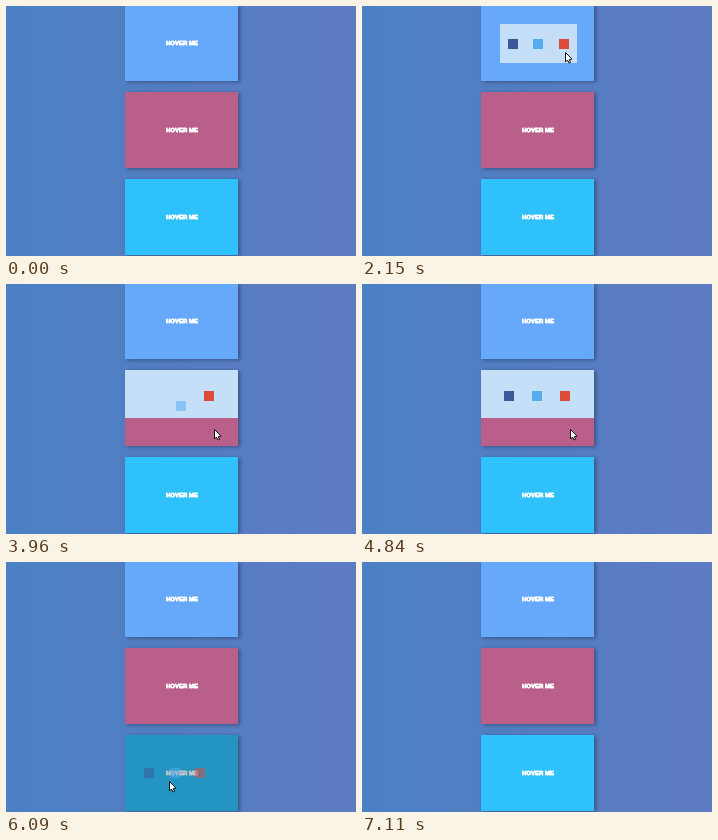
These frames come from a looping animation (350x250 px, 8.16 s). An HTML page with a canvas:

```html
<!DOCTYPE html>
<html lang="en">
<head>
<meta charset="utf-8">
<title>Hover cards</title>
<style>
  html, body { margin: 0; width: 100%; height: 100%; overflow: hidden; background: #547ec3; }
  canvas { display: block; width: 350px; height: 250px; }
</style>
</head>
<body>
<canvas id="stage" width="350" height="250"></canvas>
<script>
const ctx = document.getElementById('stage').getContext('2d');
const LOOP = 8160;
const CARD = { x: 119, w: 113, h: 76, gap: 87 };
const PALE = '#c4dff7';
const ICON_COLORS = ['#3b5998', '#55acee', '#dd4b39'];

// The pointer rests between these moves
const ENTER = { at: 230, x: 345, y: 249 };
const MOVES = [
  { from: 410, to: 710, x: 278, y: 75 },
  { from: 890, to: 1670, x: 203, y: 46 },
  { from: 2380, to: 2510, x: 300, y: 67 },
  { from: 3300, to: 3620, x: 208, y: 145 },
  { from: 5360, to: 5430, x: 293, y: 162 },
  { from: 5890, to: 6090, x: 163, y: 219 },
  { from: 6690, to: 6900, x: 337, y: 251 }
];

const clamp = v => Math.max(0, Math.min(1, v));
const mix = (a, b, p) => a + (b - a) * p;
const bezier = (a, b, s) => 3 * a * s * (1 - s) ** 2 + 3 * b * s * s * (1 - s) + s ** 3;

// CSS "ease" curve
function ease(p) {
  p = clamp(p);
  if (p === 0 || p === 1) return p;
  let lo = 0, hi = 1;
  for (let i = 0; i < 18; i++) {
    const mid = (lo + hi) / 2;
    if (bezier(0.25, 0.25, mid) < p) lo = mid; else hi = mid;
  }
  return bezier(0.1, 1, lo);
}

const hover = (t, on, off, inMs = 350, outMs = inMs) =>
  ease((t - on) / inMs) - ease((t - off) / outMs);

function rect(color, x, y, w, h) {
  ctx.fillStyle = color;
  ctx.fillRect(x, y, w, h);
}

function icons(cx, step, place) {
  ICON_COLORS.forEach((color, i) => {
    const { x = 0, y, alpha } = place(i);
    ctx.globalAlpha = clamp(alpha);
    rect(color, Math.round(cx + (i - 1) * step + x) - 5, Math.round(y) - 5, 10, 10);
  });
  ctx.globalAlpha = 1;
}

function label(y) {
  ctx.font = 'bold 6px "Liberation Sans", Arial, sans-serif';
  ctx.textAlign = 'center';
  ctx.fillStyle = ctx.strokeStyle = '#fff';
  ctx.lineWidth = 0.8;
  ctx.lineJoin = 'round';
  ctx.fillText('HOVER ME', 176, y + 40);
  ctx.strokeText('HOVER ME', 176, y + 40);
}

function card(row, color, paint) {
  const { x, w, h, gap } = CARD;
  const y = gap * row - 1;
  ctx.save();
  ctx.shadowColor = 'rgba(0,0,0,0.35)';
  ctx.shadowBlur = 4;
  ctx.shadowOffsetX = 1.5;
  ctx.shadowOffsetY = 1;
  rect(color, x, y, w, h);
  ctx.restore();
  ctx.save();
  ctx.beginPath();
  ctx.rect(x, y, w, h);
  ctx.clip();
  paint(y);
  ctx.restore();
}

// Panel opens vertically and closes horizontally
function panelCard(t) {
  const on = 1530, off = 2428;
  card(0, '#66a9fa', y => {
    label(y);
    const w = 77 * (1 - ease((t - off) / 400));
    const h = 39 * ease((t - on) / 400);
    const left = Math.round(176.5 - w / 2), top = Math.round(37.5 - h / 2);
    rect(PALE, left, top, Math.round(w), Math.round(h));
    icons(176, 25.5, i => ({
      y: 38,
      alpha: hover(t, on + 120 + 60 * (2 - i), off, 300, 120)
    }));
  });
}

// Cover slides down, icons rise one by one
function slideCard(t) {
  const on = 3555, off = 5407;
  card(1, PALE, y => {
    icons(175, 28, i => {
      const p = hover(t, on + 100 + 200 * (2 - i), off, 350, 70);
      return { y: 112 + 20 * (1 - p), alpha: p };
    });
    const dy = Math.round(48 * hover(t, on, off) - 0.2);
    rect('#ba5f89', CARD.x, y + dy, CARD.w, CARD.h);
    label(y + dy);
  });
}

// Card darkens, icons slide in from the left
function fadeCard(t) {
  const p = hover(t, 5988, 6760);
  card(2, '#2ec1fc', y => {
    label(y);
    rect(`rgba(0,0,0,${0.45 * p})`, CARD.x, y, CARD.w, CARD.h);
    icons(176, 25.5, () => ({ x: -15 * (1 - p), y: 211, alpha: p }));
  });
}

function pointer(t) {
  if (t < ENTER.at) return;
  let { x, y } = ENTER;
  for (const m of MOVES) {
    const p = clamp((t - m.from) / (m.to - m.from)) ** 1.5;
    x = mix(x, m.x, p);
    y = mix(y, m.y, p);
  }
  ctx.save();
  ctx.translate(Math.round(x) + 0.5, Math.round(y) + 0.5);
  ctx.beginPath();
  [[0, 0], [0, 9.5], [2, 7.5], [3.5, 10.5], [5, 10], [3.8, 7], [6.5, 6.6]]
    .forEach(([px, py]) => ctx.lineTo(px, py));
  ctx.closePath();
  ctx.fillStyle = '#fff';
  ctx.fill();
  ctx.strokeStyle = '#000';
  ctx.lineWidth = 0.9;
  ctx.lineJoin = 'round';
  ctx.stroke();
  ctx.restore();
}

const sky = ctx.createLinearGradient(0, 0, 350, 0);
sky.addColorStop(0, '#4b80c4');
sky.addColorStop(1, '#5e7bc2');

function draw(now) {
  const t = now % LOOP;
  rect(sky, 0, 0, 350, 250);
  panelCard(t);
  slideCard(t);
  fadeCard(t);
  pointer(t);
  requestAnimationFrame(draw);
}
draw(performance.now());
</script>
</body>
</html>
```
